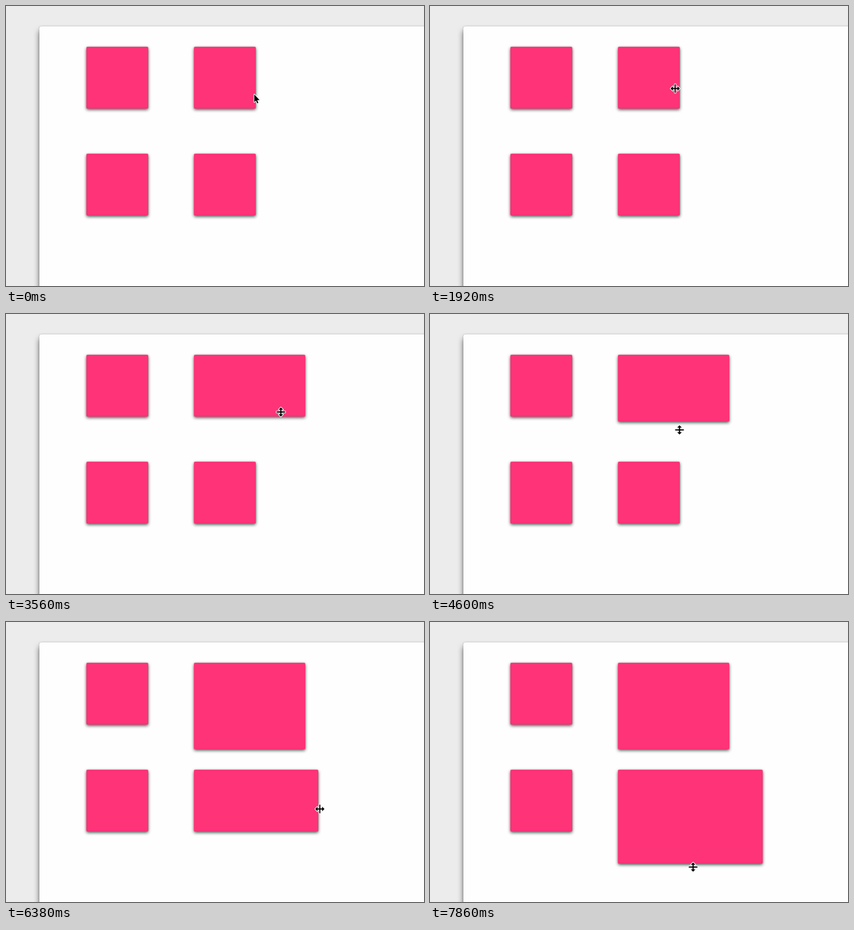
These frames come from a looping animation (676x453 px, 8000 ms). An HTML page:

```html
<!DOCTYPE html>
<html lang="en">
<head>
<meta charset="utf-8">
<title>Resizable tiles</title>
<style>
  html, body { margin: 0; width: 100%; height: 100%; overflow: hidden; background: #ececec; }
  #stage { position: relative; width: 676px; height: 453px; overflow: hidden; }
  .panel, .tile { position: absolute; border-radius: 2px; }
  .panel {
    left: 54px; top: 33px; width: 700px; height: 500px;
    background: #fefefe; border-radius: 3px;
    box-shadow: 0 7px 10px rgba(0, 0, 0, .6), 0 0 2px rgba(0, 0, 0, .3);
  }
  .tile {
    background: #ff3377;
    box-shadow: 0 2px 5px rgba(0, 0, 0, .65), 0 0 2px rgba(0, 0, 0, .25);
  }
  svg { position: absolute; left: 0; top: 0; z-index: 1; }
  path { fill: #000; stroke: #fff; stroke-width: 2; stroke-linejoin: round; paint-order: stroke; }
</style>
</head>
<body>
<div id="stage">
  <div class="panel"></div>
  <svg width="676" height="453">
    <g id="pointer">
      <path id="arrow" d="M0 .5V13L2.8 10.4L4.8 15L6.6 14.2L4.7 9.7H8.6Z"/>
      <path id="resize" d="M-7.5 0L-3.8 -3.7V-1H-.9V-7H.9V-1H3.8V-3.7L7.5 0L3.8 3.7V1H.9V7H-.9V1H-3.8V3.7Z"/>
    </g>
  </svg>
</div>
<script>
const LOOP = 8000, STEP = 148.4, LEAD = 13, LAST = 53;
const SIDE = 100, GRIP = 13;
const MOVE = 1.2, DRAG = 1.67; // ease-out strengths
const byId = id => document.getElementById(id);
const stage = byId('stage'), pointer = byId('pointer');
const arrow = byId('arrow'), resize = byId('resize');

function addTile(x, y) {
  const el = document.createElement('div');
  el.className = 'tile';
  stage.appendChild(el);
  const tile = { el, x, y };
  setSize(tile, SIDE, SIDE);
  return tile;
}

function setSize(tile, w, h) {
  tile.right = tile.x + w;
  tile.bottom = tile.y + h;
  Object.assign(tile.el.style, {
    left: tile.x + 'px', top: tile.y + 'px', width: w + 'px', height: h + 'px'
  });
}

const columns = [130, 304], rows = [66, 239];
const tiles = rows.flatMap(y => columns.map(x => addTile(x, y)));
const upper = tiles[1], lower = tiles[3];

// Pointer strokes, times in steps.
const home = { x: 401, y: 142 };
const strokes = [
  { from: 0, to: 5, x: 404, y: 143, power: MOVE },
  { from: 9, to: 11, x: 394, y: 136, power: MOVE },
  { from: 12, to: 13, x: 396, y: 133, power: MOVE },
  { from: 14, to: 22, x: 478, y: 147, power: DRAG },
  { from: 22, to: 27, x: 403, y: 172, power: MOVE },
  { from: 30, to: 34, x: 404, y: 212, power: DRAG },
  { from: 35, to: 37, x: 404, y: 295, power: MOVE },
  { from: 38, to: 39, x: 406, y: 294, power: MOVE },
  { from: 39, to: 46, x: 539, y: 305, power: DRAG },
  { from: 46, to: 50, x: 424, y: 340, power: MOVE },
  { from: 51, to: 53, x: 425, y: 396, power: MOVE }
];

function ease(k, from, to, power) {
  const u = Math.min(1, Math.max(0, (k - from) / (to - from)));
  return 1 - (1 - u) ** power;
}

const grow = (k, from, to, extra) => Math.round(SIDE + extra * ease(k, from, to, DRAG));

function pointerAt(k) {
  let { x, y } = home;
  for (const s of strokes) {
    const e = ease(k, s.from, s.to, s.power);
    x += (s.x - x) * e;
    y += (s.y - y) * e;
  }
  return [Math.round(x), Math.round(y)];
}

// A tile shows resize handles near its right and bottom edges.
function gripAt(x, y) {
  for (const t of tiles) {
    if (y > t.y && y < t.bottom && Math.abs(x - t.right) <= GRIP) return 'ew';
    if (x > t.x && x < t.right && Math.abs(y - t.bottom) <= GRIP) return 'ns';
  }
  return '';
}

function draw(ms) {
  const k = Math.min(LAST, Math.floor((ms % LOOP + LEAD) / STEP));
  setSize(upper, grow(k, 14, 22, 80), grow(k, 30.55, 34, 40));
  setSize(lower, grow(k, 39, 46, 134), grow(k, 51, 53, 52));

  const [x, y] = pointerAt(k);
  const grip = k > 0 ? gripAt(x, y) : '';
  const turn = grip === 'ns' ? ' rotate(90)' : '';
  pointer.setAttribute('transform', `translate(${x + .5} ${y + .5})${turn}`);
  arrow.style.display = grip ? 'none' : '';
  resize.style.display = grip ? '' : 'none';
}

const start = performance.now();
function tick() {
  draw(performance.now() - start);
  requestAnimationFrame(tick);
}
tick();
</script>
</body>
</html>
```
